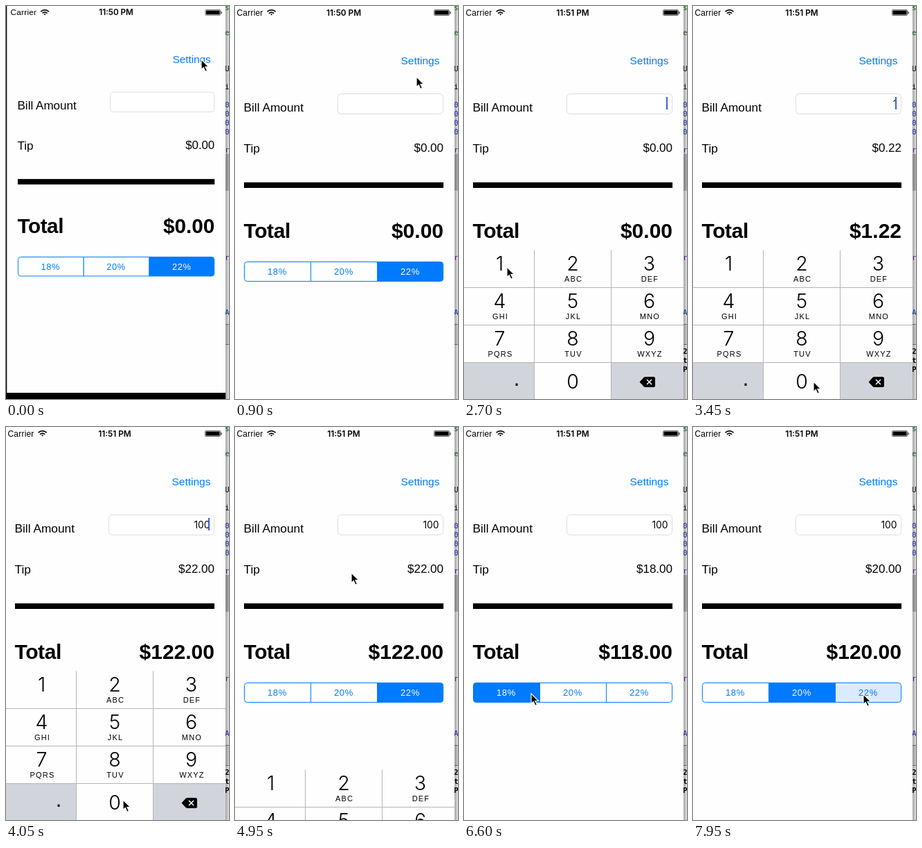
An HTML page for the animation above (8 s loop, 322x566 px).

```html
<!DOCTYPE html>
<html lang="en">
<head>
<meta charset="utf-8">
<title>Tip calculator</title>
<style>
  html, body { margin: 0; width: 100%; height: 100%; overflow: hidden; background: #000; }
  svg { display: block; width: 322px; height: 566px; font-family: "Liberation Sans", Arial, sans-serif; }
  .label { font-size: 17.3px; }
  .money { font-size: 17px; text-anchor: end; }
  .total { font-size: 30px; font-weight: bold; }
  .end { text-anchor: end; }
  .mid, .seg, .digit, .abc { text-anchor: middle; }
  .seg { font-size: 13px; letter-spacing: .7px; }
  .clock { font: 600 11.8px Inter, sans-serif; }
  .bill { font: 13.8px Inter, sans-serif; }
  .digit { font: 300 28.5px Inter, sans-serif; }
  .abc { font-size: 11px; letter-spacing: 1.2px; }
  .code { font: 11px "DejaVu Sans Mono", monospace; }
</style>
</head>
<body>
<svg viewBox="0 0 322 566">
  <defs>
    <linearGradient id="shade">
      <stop offset="0" stop-color="#000" stop-opacity=".36"/>
      <stop offset="1" stop-color="#000" stop-opacity=".12"/>
    </linearGradient>
    <clipPath id="stage"><rect width="317" height="566"/></clipPath>
    <clipPath id="screen"><rect x="-3" width="320" height="568"/></clipPath>
  </defs>

  <g id="desk" class="code">
    <rect x="317" width="5" height="566" fill="#fff"/>
    <rect x="317" y="213" width="5" height="53" fill="#c4c4c4"/>
    <rect x="317" y="458" width="5" height="30" fill="#e6e6e6"/>
    <path d="M317 458.5h5M317 487.5h5" stroke="#888"/>
  </g>

  <g clip-path="url(#stage)">
    <g id="phone" clip-path="url(#screen)">
      <rect x="-3" width="320" height="568" fill="#fefefe"/>
      <text x="2.5" y="13.5" font-size="12" letter-spacing=".2">Carrier</text>
      <g fill="none" stroke="#000" stroke-width="1.7">
        <path d="M46.6 8.2q6-5 12 0M49 10.6q3.6-3 7.2 0"/>
        <path d="M51 11.8q1.6-1.2 3.2 0l-1.6 1.7z" fill="#000" stroke="none"/>
      </g>
      <text id="clock" class="clock mid" x="157" y="13.5"></text>
      <rect x="287.5" y="5.5" width="22" height="8" rx="1.5" fill="none" stroke="#000" stroke-width=".6"/>
      <rect x="288.5" y="6.5" width="20" height="6" rx=".5"/>
      <path d="M311 8v3.5" stroke="#000"/>

      <text class="end" x="295.5" y="84" font-size="15.5" fill="#007aff">Settings</text>
      <text class="label" x="12.5" y="151.5">Bill Amount</text>
      <rect x="148.5" y="126.5" width="152" height="29" rx="5" fill="#fff" stroke="#ddd"/>
      <text id="bill" class="bill end" x="294.5" y="146"></text>
      <path id="caret" d="M293 131v18" stroke="#3c5fe0" stroke-width="2"/>
      <text class="label" x="12.5" y="211">Tip</text>
      <text id="tip" class="money" x="301" y="210"></text>
      <rect x="13" y="254" width="288" height="8"/>
      <text class="total" x="12.5" y="333.5" letter-spacing="-.4">Total</text>
      <text id="total" class="total end" x="301" y="333.5"></text>
      <g id="segments"></g>
      <g id="keys"></g>
    </g>
  </g>

  <rect x="317" width="5" height="566" fill="url(#shade)"/>
  <path id="cursor" d="M0 0V14.5l3.3-3 2.5 5.7 2.6-1.1-2.5-5.6H10.5z" stroke="#fff" stroke-width="1.2"/>
</svg>

<script>
const LOOP = 8000, STEP = 150, BLUE = '#007aff', GRAY = '#d1d4db', WHITE = '#fefefe';
const $ = id => document.getElementById(id);

function add(parent, tag, attrs, text = '') {
  const el = document.createElementNS('http://www.w3.org/2000/svg', tag);
  for (const name in attrs) el.setAttribute(name, attrs[name]);
  el.textContent = text;
  return parent.appendChild(el);
}

// Value(s) at time t on a track of [time, ...values], linear between points
function track(points, t) {
  const next = points.findIndex(p => p[0] > t);
  if (next < 1) return points.at(next).slice(1);
  const a = points[next - 1], b = points[next], k = (t - a[0]) / (b[0] - a[0]);
  return a.slice(1).map((v, i) => v + (b[i + 1] - v) * k);
}

const cursorPath = [
  [0, 282, 77], [600, 282, 77], [1350, 232, 140], [1800, 232, 140], [2700, 62, 376],
  [3000, 62, 376], [3450, 174, 541], [4050, 169, 537], [4650, 168, 210], [5100, 168, 210],
  [6000, 95, 384], [6300, 95, 384], [6600, 97, 384], [7050, 172, 387], [7500, 172, 387],
  [7800, 246, 385]
];
const keyboardDrop = [
  [1500, 220], [1650, 65], [1800, 7], [1950, 0], [4800, 0], [4950, 142], [5100, 220]
];
const zoomOut = [[0, 1], [150, .4], [300, .1], [450, 0]];

// Edge of the editor behind the phone
[['s', 6, '#177a17'], ['e', 42, '#177a17'], ['U', 94, '#000'], ['i', 120, '#000'],
 ['0', 146, '#1c2fd0'], ['0', 159, '#1c2fd0'], ['0', 172, '#1c2fd0'], ['0', 185, '#1c2fd0'],
 ['r', 211, '#7a20c8'], ['r', 366, '#7a20c8'], ['A', 445, '#1c2fd0']
].forEach(([c, y, fill]) => add($('desk'), 'text', { x: 316, y, fill }, c));
const log = add($('desk'), 'g', { 'font-weight': 'bold' });
['2', 't', 'P'].forEach((c, i) => add(log, 'text', { x: 316, y: 501 + i * 13 }, c));

const segments = ['18%', '20%', '22%'].map((name, i) => {
  const x = 13.5 + i * 96, r = 4;
  const d = [
    `M${x + 96} 368.5H${x + r}q-4 0-4 4v20q0 4 4 4H${x + 96}z`,
    `M${x} 368.5h96v28h-96z`,
    `M${x} 368.5h${95 - r}q4 0 4 4v20q0 4-4 4H${x}z`
  ][i];
  return {
    box: add($('segments'), 'path', { d, stroke: BLUE }),
    text: add($('segments'), 'text', { class: 'seg', x: x + 47.5, y: 387 }, name)
  };
});

const letters = ['', 'ABC', 'DEF', 'GHI', 'JKL', 'MNO', 'PQRS', 'TUV', 'WXYZ'];
const edges = [-3, 101.5, 212.5, 317], centers = [51.5, 157, 267.5];
const keys = [...'123456789.0<'].map((name, i) => {
  const col = i % 3, y = 351.5 + 54 * Math.floor(i / 3), x = centers[col], g = $('keys');
  const box = add(g, 'rect', { x: edges[col], y, width: edges[col + 1] - edges[col], height: 54 });
  if (name === '<') {
    add(g, 'path', { d: 'M253.5 541.5l6-6.5q1-1 2.5-1h11.5q2.5 0 2.5 2.5v10q0 2.5-2.5 2.5H262q-1.5 0-2.5-1z' });
    add(g, 'path', { d: 'M264 538l7 7m0-7l-7 7', stroke: '#fff', 'stroke-width': 1.5 });
  } else if (name === '.') {
    add(g, 'rect', { x: 74.5, y: 543.5, width: 3, height: 3.5 });
  } else {
    add(g, 'text', { class: 'digit', x, y: i > 8 ? 551 : y + 29.5 }, name);
    if (letters[i]) add(g, 'text', { class: 'abc', x: x + 1, y: y + 45 }, letters[i]);
  }
  return { name, box, fill: '.<'.includes(name) ? GRAY : WHITE };
});
add($('keys'), 'path', {
  d: 'M101.5 351.5v216M212.5 351.5v216M-3 405.5h320M-3 459.5h320M-3 513.5h320',
  stroke: '#b2b5ba', fill: 'none'
});

function draw(t) {
  const bill = t >= 4050 ? 100 : t >= 3750 ? 10 : t >= 3000 ? 1 : 0;
  const chosen = t >= 7200 ? 1 : t >= 6300 ? 0 : 2;
  const tip = bill * [.18, .2, .22][chosen];
  $('bill').textContent = bill || '';
  $('tip').textContent = '$' + tip.toFixed(2);
  $('total').textContent = '$' + (bill + tip).toFixed(2);
  $('clock').textContent = t < 1200 ? '11:50 PM' : '11:51 PM';

  const caretOn = t >= 1650 && t < 4950 && !(t >= 2250 && t < 2700);
  $('caret').style.display = caretOn ? '' : 'none';
  log.style.display = t < 1650 ? 'none' : '';

  const pressed = t === 6150 ? 0 : t === 7050 ? 1 : t === 7950 ? 2 : -1;
  segments.forEach(({ box, text }, i) => {
    box.setAttribute('fill', i === chosen ? BLUE : i === pressed ? '#d9ebff' : '#fff');
    text.setAttribute('fill', i === chosen ? '#fff' : BLUE);
  });

  const held = t === 2850 ? '1' : t === 3600 || t === 3900 ? '0' : '';
  keys.forEach(k => k.box.setAttribute('fill', k.name === held ? GRAY : k.fill));
  $('keys').setAttribute('transform', `translate(0 ${track(keyboardDrop, t)})`);

  const [z] = track(zoomOut, t), sx = 1 - .013 * z, sy = 1 - .019 * z;
  $('phone').setAttribute('transform', `translate(${317 * (1 - sx)} 0) scale(${sx} ${sy})`);
  $('cursor').setAttribute('transform', `translate(${track(cursorPath, t)})`);
}

function tick() {
  const t = performance.now() % LOOP;
  draw(Math.floor(t / STEP) * STEP);
  requestAnimationFrame(tick);
}
tick();
</script>
</body>
</html>
```
